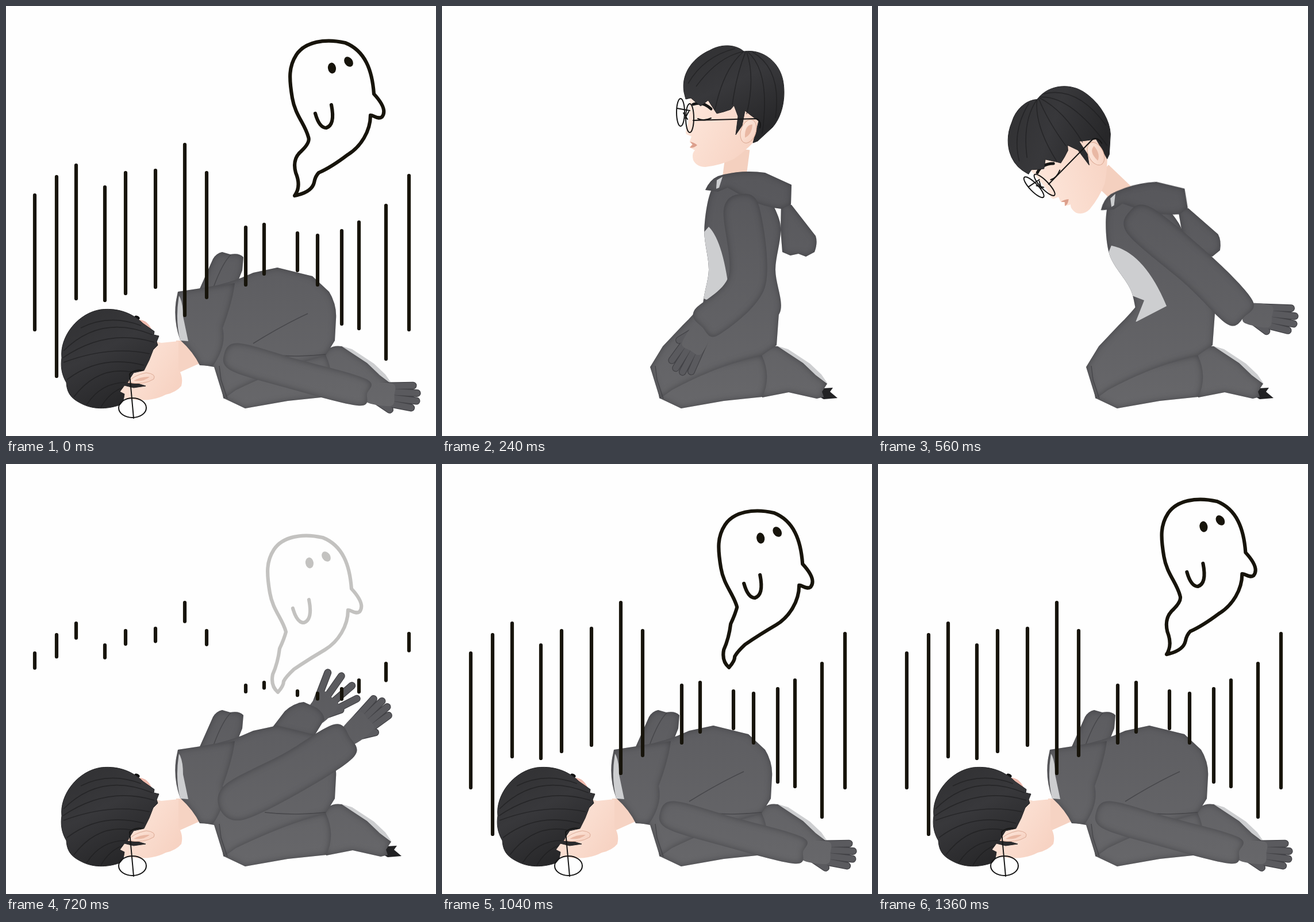
An HTML page for the animation above (1.44 s loop, 748 px wide and 748 px high).

```html
<!DOCTYPE html>
<html lang="en">
<head>
<meta charset="utf-8">
<title>Collapse</title>
<style>
html, body { margin: 0; width: 100%; height: 100%; overflow: hidden; background: #fefefe; }
svg { display: block; width: 100vw; height: 100vh; }
.fur { fill: url(#fur); }
.soft { filter: url(#round); }
.skin { fill: url(#skin); }
.hair { fill: url(#hair); stroke: #262628; stroke-width: 1; stroke-linejoin: round; }
.white { fill: #cdced0; }
.line { fill: none; stroke: #161616; stroke-width: 2; stroke-linecap: round; }
.strand { fill: none; stroke: #1b1b1d; stroke-width: 1.6; opacity: .6; }
.crease { fill: none; stroke: #414145; stroke-width: 1.5; opacity: .8; }
.ink { fill: none; stroke: #17140b; stroke-width: 6.2; stroke-linecap: round; stroke-linejoin: round; }
.rim { fill: none; stroke: #424246; stroke-width: 13; stroke-linecap: round; }
.finger { fill: none; stroke: #5a5a5e; stroke-width: 10.5; stroke-linecap: round; }
#neck { stroke: #f4d0bf; stroke-width: 41; }
</style>
</head>
<body>
<svg viewBox="0 0 748 748">
  <defs>
    <linearGradient id="fur" gradientUnits="userSpaceOnUse" x1="0" y1="290" x2="0" y2="700">
      <stop offset="0" stop-color="#57575b"/><stop offset="1" stop-color="#67676a"/>
    </linearGradient>
    <linearGradient id="skin" x1="0" y1="0" x2="1" y2=".6">
      <stop offset="0" stop-color="#fee9de"/><stop offset="1" stop-color="#f7d3c3"/>
    </linearGradient>
    <linearGradient id="hair" x1="0" y1="0" x2=".5" y2="1">
      <stop offset="0" stop-color="#303032"/><stop offset=".5" stop-color="#38383b"/><stop offset="1" stop-color="#272729"/>
    </linearGradient>
    <filter id="round" filterUnits="userSpaceOnUse" x="0" y="0" width="748" height="748" color-interpolation-filters="sRGB">
      <feFlood flood-color="#29292d" flood-opacity=".55"/>
      <feComposite in2="SourceAlpha" operator="out"/>
      <feGaussianBlur stdDeviation="6"/>
      <feComposite in2="SourceAlpha" operator="in" result="edge"/>
      <feMerge><feMergeNode in="SourceGraphic"/><feMergeNode in="edge"/></feMerge>
    </filter>
    <clipPath id="front"><path id="torsoClip"/><path d="M448 549L418 556 463 505 520 470 570 560Z"/></clipPath>
  </defs>

  <g id="far">
    <path id="farHand"/>
    <path class="fur soft" d="M462 460L485 430Q500 416 518 414L540 424Q552 432 554 444L535 475Z"/>
  </g>

  <path fill="#222224" d="M650 676L662 665 680 664 675 671 688 682 664 684Z"/>
  <path class="white" d="M582 591L602 597 640 622 660 641 671 657 600 606Z"/>
  <path class="fur soft" d="M548 612Q560 588 584 592L628 621 650 642 670 657 661 671 664 680 652 683 603 672 557 681Z"/>
  <path class="fur soft" d="M374 655L378 682 416 700 490 687 557 680Q574 645 556 607L470 625 400 640Z"/>

  <g id="sitting">
    <g class="soft"><path id="earsUp" class="fur" d="M590 340L608 346 650 400Q654 412 648 428L633 436 620 431 606 434 592 428 589 390Z"/></g>
    <path id="neck"/>
    <g class="soft">
      <path class="fur" d="M362 628L384 592 418 556Q440 535 463 505L520 470 570 480 586 535 582 590 556 608Q480 625 400 668L379 683Z"/>
      <path id="torso" class="fur"/>
    </g>
    <path id="belly" class="white" clip-path="url(#front)"/>
    <g id="hood">
      <path class="fur soft" d="M458 320Q466 302 480 296Q520 284 562 290L608 311 607 345 591 353Q560 350 530 335L497 316 480 323Z"/>
      <path class="white" d="M477 318L478 303 488 297 482 316Z"/>
    </g>
  </g>

  <g id="lying">
    <g class="soft">
      <path class="fur" d="M336 494L360 440Q366 430 376 428L390 432Q406 429 413 437L411 460 395 500 360 520Z"/>
    </g>
    <path class="crease" d="M391 433Q377 446 361 489"/>
    <path d="M296 582L330 582 336 622 296 640Z" fill="#f6d3c3"/>
    <path class="fur soft" d="M362 628L345 625 304 500 345 490Q390 483 430 464L472 455 533 470 562 497Q576 520 574 545L572 582 556 608Q490 625 400 668L379 683Z"/>
    <path class="fur soft" d="M337 625Q326 602 303 581Q288 540 299 497L345 490 398 482Q394 515 377 560Q384 592 360 626Z"/>
    <path class="white" d="M301 504Q308 515 308 540L317 583 303 582Q294 545 301 504Z"/>
    <path class="crease" d="M430 587Q480 556 525 535M556 606Q500 612 450 606"/>
  </g>

  <path class="crease" d="M371 626L374 650 385 683"/>
  <path id="hand"/>
  <path id="arm" class="fur soft"/>

  <g id="head">
    <path class="skin" d="M432 140L430 185 428 205Q422 219 425 223L434 227 431 235 435 240 431 246 440 251Q434 256 437 268Q443 280 458 280Q485 277 508 266Q528 252 545 234L556 190 520 140Z"/>
    <path d="M431 236Q438 237 444 242 437 248 431 246L436 241Z" fill="#dc9f8c"/>
    <path class="line" d="M445 196Q455 201 468 195"/>
    <path class="line" d="M437 171Q453 165 468 179" style="stroke-width:5"/>
    <path class="hair" d="M421 150C415 115 440 88 466 77C485 66 510 66 525 79C560 74 590 100 594 135C598 165 590 194 575 211L549 235 541 238 547 216 551 200 537 190 527 182 522 208 511 224 515 192 508 173 502 180 490 184 478 187 474 181 463 164 450 174 441 167 433 160 424 162Z"/>
    <path class="strand" d="M525 79Q480 88 442 140M525 79Q490 108 475 180M528 80Q512 120 505 172M530 80Q545 125 530 188M532 80Q572 115 557 222M540 80Q592 110 580 195M510 74Q455 88 428 135"/>
    <ellipse class="skin" cx="533" cy="218" rx="13" ry="21" transform="rotate(18 533 218)" stroke="#dcab96"/>
    <path d="M540 206Q526 207 527 229Q539 224 540 206Z" fill="#e9b8a4"/>
    <path class="line" d="M437 199L547 196Q556 200 553 212M409 178L431 182M420 186L427 197M423 195L429 184"/>
    <ellipse class="line" cx="415" cy="185" rx="7" ry="24"/>
    <ellipse class="line" cx="431" cy="195" rx="7" ry="25"/>
  </g>

  <g id="headDown">
    <path d="M228 546Q245 544 254 564L240 570Z" fill="#eeb9ac"/>
    <ellipse cx="228" cy="542" rx="5" ry="3" transform="rotate(25 228 542)" fill="#111"/>
    <path class="skin" d="M255 582L270 586 300 583 300 632Q309 645 305 661Q296 672 278 676Q255 688 225 685L196 682 200 640 240 605Z"/>
    <path class="hair" d="M97 612C93 575 125 534 165 528C202 524 226 540 238 552L258 566 257 572 266 574 262 584 264 590 256 598 249 616 240 634 222 638 213 652 243 661 222 664 206 660 198 671 206 675 204 687 198 694C175 702 150 702 130 691C112 682 106 672 105 655C96 640 95 625 97 612Z"/>
    <path class="strand" d="M100 600Q165 535 255 572M99 612Q175 560 258 585M100 620Q180 590 250 605M106 650Q165 605 240 625M118 680Q160 625 220 637M140 694Q165 655 208 655M130 560Q180 535 235 556M165 698Q180 672 203 664"/>
    <path class="skin" d="M212 655Q222 642 244 638Q262 640 257 649Q240 660 212 655Z" stroke="#dcab96"/>
    <path d="M222 652Q235 644 250 645Q240 654 222 652Z" fill="#e9b8a4"/>
    <path class="line" d="M215 640L222 717M215 640Q224 632 237 634"/>
    <ellipse class="line" cx="220" cy="699" rx="24" ry="17"/>
  </g>

  <path id="rain" class="ink" d="M50 329v234M88 297v347M122 277v232M172 315v197M208 290v210M260 286v203M311 241v297M349 290v217M417 385v100M449 380v86M507 395v65M542 399v86M584 391v162M614 376v185M661 347v267M701 295v268"/>
  <g id="ghost">
    <path id="sheet" class="ink"/>
    <path class="ink" d="M538 187Q545 212 557 212Q573 207 566 172"/>
    <g fill="#17140b">
      <ellipse cx="567" cy="108" rx="7" ry="9.5" transform="rotate(-10 567 108)"/>
      <ellipse cx="596" cy="97" rx="7" ry="9.5" transform="rotate(-35 596 97)"/>
    </g>
  </g>
</svg>
<script>
const STEP = 80, STEPS = 18, SIT = 3, FALLEN = 9;
const el = id => document.getElementById(id);
const setD = (id, d) => el(id).setAttribute('d', d);
const show = (id, on) => { el(id).style.display = on ? '' : 'none'; };
const mix = (a, b, k) => a.map((v, i) => v + (b[i] - v) * k);

// Joints of the figure: neck and head are x, y, turn; palm is the way the hand points
const poses = [
  { neck: [507, 310, 0], head: [533, 218, 0], elbow: [530, 480], wrist: [460, 551], palm: [120], girth: [1] },
  { neck: [497, 320, 0], head: [539, 234, 10], elbow: [588, 437], wrist: [549, 528], palm: [128], girth: [1] },
  { neck: [434, 336, -11], head: [379, 257, -44], elbow: [560, 462], wrist: [630, 533], palm: [8], girth: [1] },
  { neck: [353, 595, -80], head: [238, 648, -95], elbow: [500, 536], wrist: [588, 481], palm: [-42], girth: [1.1] },
  { neck: [355, 617, -80], head: [238, 648, -95], elbow: [500, 640], wrist: [620, 672], palm: [5], girth: [.8] }
];

function poseAt(u) {
  const i = Math.min(3, Math.floor(u)), pose = {};
  for (const key in poses[i]) pose[key] = mix(poses[i][key], poses[i + 1][key], u - i);
  return pose;
}

// Point given in a turned frame
function local([x, y, turn], dx, dy) {
  const a = turn * Math.PI / 180, c = Math.cos(a), s = Math.sin(a);
  return [x + dx * c - dy * s, y + dx * s + dy * c];
}

// Closed smooth curve through the points
function curve(p, pull = .16) {
  const pt = i => p[(i + p.length) % p.length];
  return p.reduce((d, b, i) => {
    const a = pt(i - 1), c = pt(i + 1), e = pt(i + 2);
    return d + `C${b.map((v, j) => v + (c[j] - a[j]) * pull)} ${c.map((v, j) => v - (e[j] - b[j]) * pull)} ${c}`;
  }, 'M' + p[0]) + 'Z';
}

// Outline of a limb along joints [point, radius], with rounded ends
function limb(joints, startCap, endCap) {
  const left = [], right = [], ends = [];
  joints.forEach(([[x, y], r], i) => {
    const [a] = joints[Math.max(0, i - 1)], [b] = joints[Math.min(joints.length - 1, i + 1)];
    const len = Math.hypot(b[0] - a[0], b[1] - a[1]);
    const dx = (b[0] - a[0]) / len * r, dy = (b[1] - a[1]) / len * r;
    left.push([x + dy, y - dx]);
    right.unshift([x - dy, y + dx]);
    if (i === 0) ends[0] = [x - dx * startCap, y - dy * startCap];
    if (i === joints.length - 1) ends[1] = [x + dx * endCap, y + dy * endCap];
  });
  return curve([ends[0], ...left, ends[1], ...right]);
}

// Palm, four fingers and a thumb
function drawHand(id, x, y, turn, spread) {
  const wrist = [x, y, turn];
  let d = '';
  const stick = (a, b) => { d += `M${a}L${b}`; };
  for (let k = -1.5; k < 2; k++) {
    const base = local(wrist, 20, k * 9);
    stick(base, local([...base, turn + k * spread], 66 - k * k * 4, 0));
  }
  stick(local(wrist, 18, 14), local(wrist, 40, 26));
  for (const part of ['rim', 'finger']) setD(id + part, d);
  setD(id + 'palm', limb([[[x, y], 17], [local(wrist, 42, 0), 19]], .2, .2));
}

function makeHand(id) {
  const spot = el(id);
  for (const part of ['rim', 'finger', 'palm']) {
    const path = spot.cloneNode();
    path.id = id + part;
    path.setAttribute('class', part === 'palm' ? 'fur' : part);
    spot.before(path);
  }
  spot.remove();
}

function drawFigure(u) {
  const { neck, head, elbow, wrist, palm, girth: [g] } = poseAt(u);
  const down = u >= 3;
  const [nx, ny, turn] = neck;

  const hip = [522, 535], chest = local(neck, 15, 72);
  const spine = limb([[hip, 65], [mix(hip, chest, .5), 58], [chest, 66], [[nx, ny], 38]], .6, .3);
  setD('torso', spine);
  setD('torsoClip', spine);
  const top = local(neck, -43, 74);
  setD('belly', `M${top}Q${mix(top, [520, 440], .5)} 502 522L448 550 463 512 380 480Z`);
  const hood = `translate(${nx} ${ny}) rotate(${turn}) translate(-507 -310)`;
  for (const id of ['hood', 'earsUp']) el(id).setAttribute('transform', hood);
  setD('neck', `M${nx} ${ny}L${local(head, -18, 30)}`);
  el('head').setAttribute('transform', `translate(${head[0]} ${head[1]}) rotate(${head[2]}) translate(-533 -218)`);

  setD('arm', limb([[local(neck, 14, 42), 31 * g], [elbow, 33 * g], [wrist, 30 * g]], .8, .35));
  drawHand('hand', ...local([...wrist, palm[0]], 10, 0), palm[0], 4);
  el('far').setAttribute('transform', `translate(0 ${(u - 3) * 110})`);

  for (const id of ['sitting', 'head']) show(id, !down);
  for (const id of ['lying', 'headDown']) show(id, down);
  show('far', down && u < 3.9);
}

// Mixes two paths that share the same commands
function blend(a, b, k) {
  const to = b.match(/\d+/g);
  let i = 0;
  return a.replace(/\d+/g, n => +n + (to[i++] - n) * k);
}

const sheet = 'M526 228C520 205 503 190 498 160C492 125 492 105 505 85C520 62 555 56 590 64C625 78 637 112 640 153C652 166 663 182 654 193C647 198 640 190 634 190C634 218 617 245 594 259';
const tailUp = 'Q565 281 544 290Q538 296 536 307Q532 324 502 330Q514 314 504 290Q498 268 511 255Q530 238 526 228Z';
const tailDown = 'Q565 276 540 293Q526 306 522 314Q522 322 512 333Q499 322 503 302Q512 282 515 257Q523 240 526 228Z';
const rain = el('rain').getAttribute('d');

function drawSpirit(step) {
  const n = step || STEPS, on = n >= FALLEN;
  show('ghost', on);
  show('rain', on);
  if (!on) return;
  const age = n - FALLEN;
  const lift = 64 * (1 - age / (STEPS - FALLEN)) ** 1.9;
  const grow = Math.min(1, .11 + age * .225);
  el('ghost').setAttribute('transform', `translate(${-lift * .61} ${lift})`);
  el('ghost').setAttribute('opacity', Math.min(1, (age + 1) / 4));
  setD('sheet', sheet + blend(tailUp, tailDown, Math.min(1, lift / 19)));
  setD('rain', rain.replace(/v(\d+)/g, (_, len) => 'v' + len * grow));
}

// Sits still, sways and falls evenly, then the arms drop and slow down
function poseOf(step) {
  const n = step || STEPS;
  if (n <= FALLEN) return Math.max(0, (n - SIT) / 2);
  return 4 - Math.max(0, 1 - (n - FALLEN) / 3) ** 2;
}

makeHand('hand');
makeHand('farHand');
drawHand('farHand', 536, 440, -48, 14);

let last = -1;
function draw(ms) {
  const step = Math.floor(ms / STEP) % STEPS;
  if (step === last) return;
  last = step;
  drawFigure(poseOf(step));
  drawSpirit(step);
}

const start = performance.now();
function tick() {
  draw(performance.now() - start);
  requestAnimationFrame(tick);
}
tick();
</script>
</body>
</html>
```
